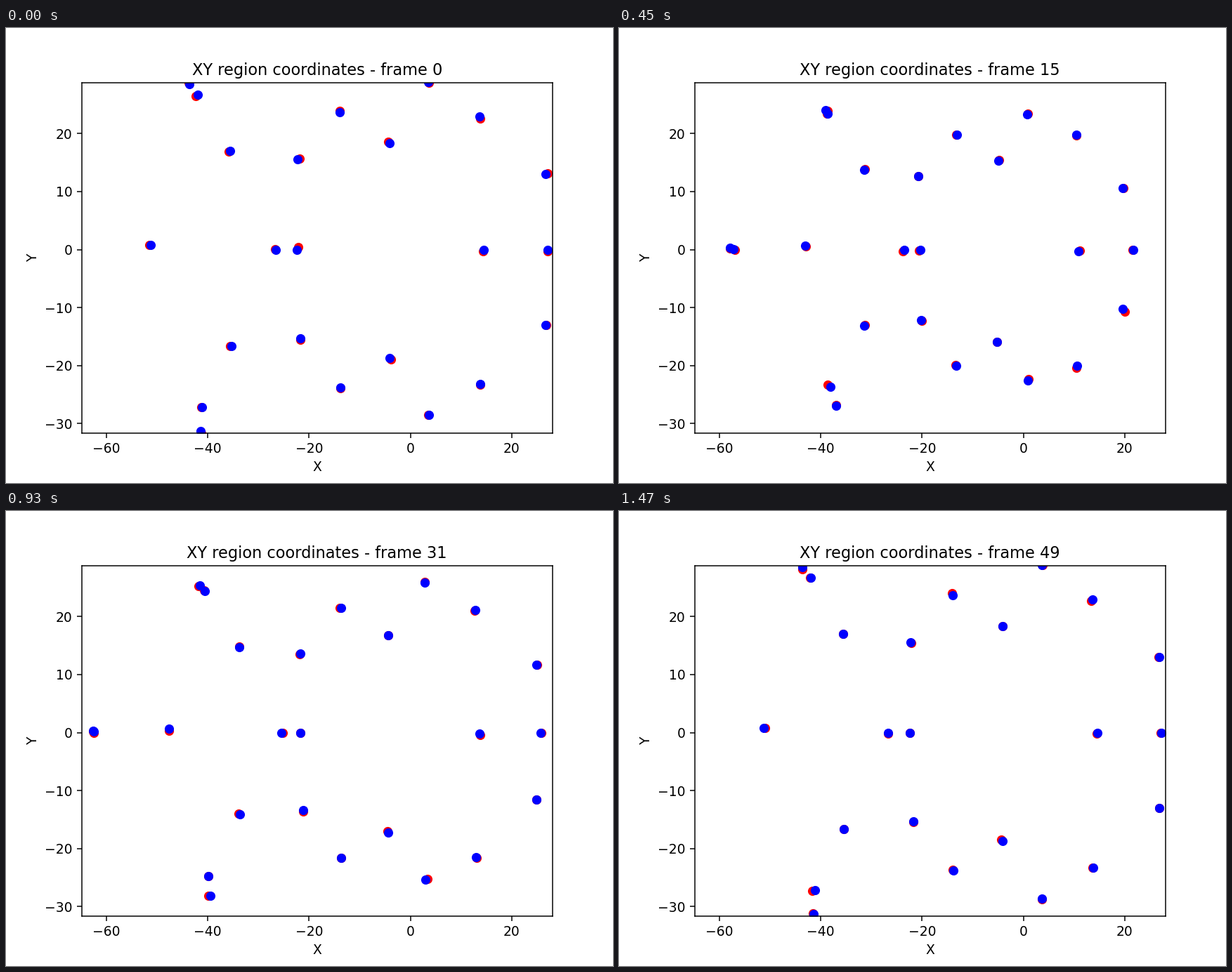
These frames come from a looping animation (864 by 648 pixels, 1500 ms). A matplotlib script:

```python
import numpy as np
import matplotlib.pyplot as plt
from matplotlib.animation import FuncAnimation

WIDTH, HEIGHT, DPI = 864, 648, 135
FRAMES, INTERVAL = 50, 30
STEPS = np.arange(FRAMES)

# Pixel position of the data origin and pixels per data unit
ORIGIN = np.array([576.4, 315.6])
SCALE = np.array([7.2125, -8.264])

# Each region: relaxed position, then its shift when contracted (stage pixels)
UPPER_WALL = [
    (262, 80, 33, 37), (273.5, 95, 24, 27), (320, 175, 30, 27),
    (416, 187.5, 11, 24), (475.5, 120, 6, 32), (546.5, 164, -6, 25),
    (602, 77, -20, 46), (674.5, 126.5, -23, 26), (769, 208.5, -51, 20)]
MIDDLE = [
    (772, 316.5, -39, 0), (681, 316, -26, 2), (414.5, 316, 15, 0),
    (384.5, 316, 22, 0), (207, 309, 59, 1), (98, 313, 61, 0), (96, 313, 68, 2)]
LOWER_WALL = [
    (769, 423, -51, -23), (675.5, 507.5, -23, -26), (602.5, 551.5, -20, -49),
    (546.5, 470, -8, -23), (476.5, 512, 4, -31), (419.5, 442, 11, -26),
    (321.5, 453, 28, -29), (279.5, 540.5, 22, -29), (278, 574, 32, -36)]

regions = np.array(UPPER_WALL + MIDDLE + LOWER_WALL)
rest, shift = regions[:, :2], regions[:, 2:]


def pulse(levels):
    """Periodic Hermite curve through the beat's levels, sampled per step."""
    times = np.array([0, 9, 15, 23, 31, 39])
    v = np.array(levels)
    gap = np.diff(np.append(times, FRAMES))
    rate = (np.roll(v, -1) - v) / gap
    prev_gap, prev_rate = np.roll(gap, 1), np.roll(rate, 1)
    slope = (prev_rate * gap + rate * prev_gap) / (gap + prev_gap)
    i = np.searchsorted(times, STEPS, side="right") - 1
    j = (i + 1) % len(v)
    h = gap[i]
    s = (STEPS - times[i]) / h
    return ((1 + 2 * s) * (1 - s) ** 2 * v[i] + s * (1 - s) ** 2 * h * slope[i]
            + s * s * (3 - 2 * s) * v[j] + s * s * (s - 1) * h * slope[j])


def drift(rng, size=1.5, knots=8):
    """Small smooth wander of one measured coordinate."""
    return np.interp(STEPS, np.linspace(0, FRAMES - 1, knots),
                     rng.normal(0, size, knots))


# Shortening (x) and squeeze (y); the left side relaxes later
beat = np.array([pulse([0, .56, 1, .77, .26, .12]),
                 pulse([0, .5, 1, 1, .54, .36])])
late = pulse([0, 0, 0, .09, .17, .17])
lateness = np.clip((520 - rest[:, 0]) / 200, 0, 1)
amount = beat + lateness[:, None, None] * late
path = rest[:, :, None] + shift[:, :, None] * amount

rng = np.random.default_rng(4)
wander = np.array([[drift(rng), drift(rng)] for _ in regions])


def to_data(pixels):
    return (pixels - ORIGIN[:, None]) / SCALE[:, None]


fitted, measured = to_data(path), to_data(path + wander)

fig, ax = plt.subplots(figsize=(WIDTH / DPI, HEIGHT / DPI), dpi=DPI)
ax.set_xlim(-64.85, 27.99)
ax.set_ylim(-31.6, 28.78)
ax.set_xlabel("X")
ax.set_ylabel("Y")
title = ax.set_title("")
red, = ax.plot([], [], "o", color="red")
blue, = ax.plot([], [], "o", color="blue")


def draw(step):
    red.set_data(*measured[:, :, step].T)
    blue.set_data(*fitted[:, :, step].T)
    title.set_text(f"XY region coordinates - frame {step}")
    return red, blue, title


anim = FuncAnimation(fig, draw, frames=FRAMES, interval=INTERVAL,
                     repeat=True, repeat_delay=0)
plt.show()
```
